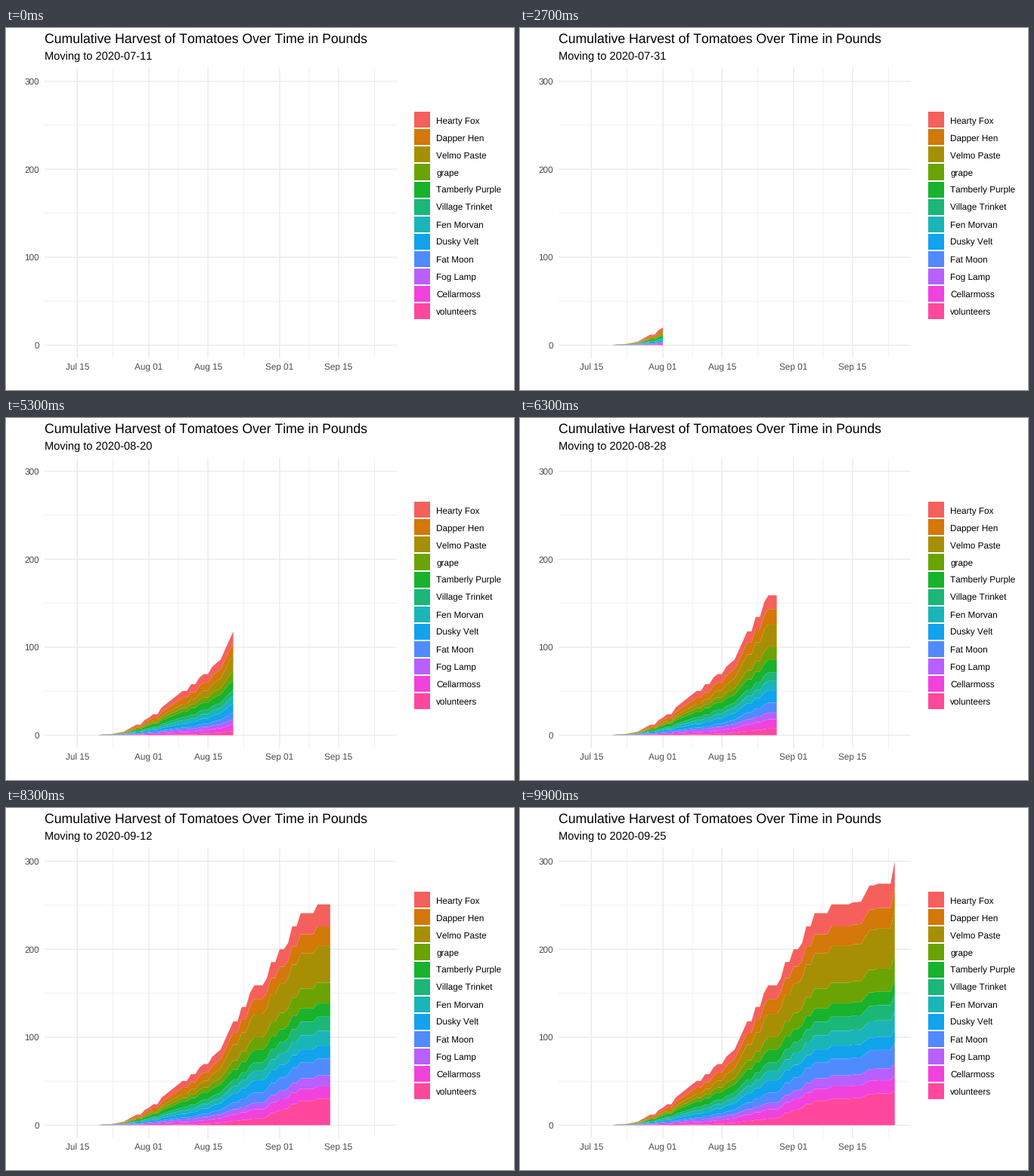
These frames come from a looping animation (672 px wide and 480 px high, 10000 ms). A matplotlib script:

```python
import numpy as np
import matplotlib.pyplot as plt
from matplotlib.animation import FuncAnimation
from matplotlib.patches import Polygon, Rectangle

plt.rcParams["font.family"] = "Liberation Sans"
plt.rcParams["text.hinting"] = "none"
plt.rcParams["text.kerning_factor"] = 6      # no pair kerning

W, H, DPI = 672, 480, 96
FRAMES, INTERVAL = 100, 100
LAST_DAY = 76          # days after July 11
FIRST_PICK = 9
LEFT, RIGHT, TOP, BOTTOM = 50.8, 517, 52.5, 438
GREY = "#4D4D4D"

# Name, colour, pounds picked once the whole harvest reaches each milestone.
MILESTONES = (58, 159, 274.5)
VARIETIES = [
    ("Hearty Fox", "#F5605C", (9, 15.5, 27.5)),
    ("Dapper Hen", "#D37809", (8, 17, 23.5)),
    ("Velmo Paste", "#A78F05", (5.5, 26.5, 45.5)),
    ("grape", "#6BA304", (4.5, 14.5, 26)),
    ("Tamberly Purple", "#18B22C", (7.5, 14, 15.5)),
    ("Village Trinket", "#1AB778", (4, 10, 17.5)),
    ("Fen Morvan", "#1AB5B8", (4.5, 10.5, 18.5)),
    ("Dusky Velt", "#12A3ED", (5, 14, 15)),
    ("Fat Moon", "#508AFF", (2.5, 11.5, 21)),
    ("Fog Lamp", "#B85FFF", (3.5, 7.5, 13.5)),
    ("Cellarmoss", "#F142DD", (3, 10.5, 15)),
    ("volunteers", "#FF479D", (1, 7.5, 36)),
]

# Harvest trend as (day, pounds); on rest days the total stands still.
TREND = [(9, 0), (10, 1), (12, 1.2), (15, 4), (21, 20), (31, 58), (34, 69.5),
         (38, 86), (41, 118), (46, 159), (49, 167.5), (50, 185.5), (52, 200),
         (54, 207), (55, 226), (57, 241), (61, 251), (68, 254), (70, 272.5),
         (72, 274.5), (76, 300)]
REST = {19, 23, 30, 32, 35, 42, 44, 47, 48, 51, 53, 56, 71,
        *range(58, 61), *range(62, 66), *range(73, 76)}


def px(day):
    return 72 + 5.576 * np.asarray(day, float)


def py(pounds):
    return 420.6 - 1.1665 * np.asarray(pounds, float)


def band_edges(totals):
    """Stacked edges, top to bottom, with the zero line last."""
    parts = np.array([np.interp(totals, (0, *MILESTONES), (0, *picked))
                      for _, _, picked in VARIETIES])
    parts *= totals / np.maximum(parts.sum(axis=0), 1e-9)
    return np.vstack([parts[::-1].cumsum(axis=0)[::-1], np.zeros(len(totals))])


days = np.arange(FIRST_PICK, LAST_DAY + 1)
pick_days = [d for d in days if d not in REST]
trend = np.interp(pick_days, *zip(*TREND))
totals = trend[np.searchsorted(pick_days, days, side="right") - 1]
edges = band_edges(totals)

# Each day is reached on a whole frame; the front moves evenly in between.
all_days = np.arange(LAST_DAY + 1)
arrival = np.round((FRAMES - 1) * all_days / LAST_DAY)

fig = plt.figure(figsize=(W / DPI, H / DPI), dpi=DPI, facecolor="white")
ax = fig.add_axes([0, 0, 1, 1])
ax.set_xlim(0, W)
ax.set_ylim(H, 0)
ax.axis("off")


def rule(xs, ys, px_width):
    ax.plot(xs, ys, color="#EBEBEB", lw=px_width * 72 / DPI, snap=False,
            solid_capstyle="butt", zorder=1)


def label(x, y, text, size, color="black", ha="left"):
    return ax.text(x, y, text, size=size, color=color, ha=ha, va="baseline")


ticks = {4: "Jul 15", 21: "Aug 01", 35: "Aug 15", 52: "Sep 01", 66: "Sep 15"}
for day in (12.5, 28, 43.5, 59, 74.5):
    rule([px(day)] * 2, [TOP, BOTTOM], 0.71)
for pounds in (50, 150, 250):
    rule([LEFT, RIGHT], [py(pounds)] * 2, 0.71)
for day, name in ticks.items():
    rule([px(day)] * 2, [TOP, BOTTOM], 1.42)
    label(px(day), 453, name, 8.8, GREY, "center")
for pounds in (0, 100, 200, 300):
    rule([LEFT, RIGHT], [py(pounds)] * 2, 1.42)
    label(44, py(pounds) + 4.2, str(pounds), 8.8, GREY, "right")

label(50.8, 20, "Cumulative Harvest of Tomatoes Over Time in Pounds", 13.2)
subtitle = label(50.8, 42, "", 11)

bands = []
for i, (name, color, _) in enumerate(VARIETIES):
    y = 111.36 + 23.04 * i
    ax.add_patch(Rectangle((540, y), 21.3, 21.04, fc=color, lw=0))
    label(569.4, y + 15.1, name, 8.8)
    band = Polygon(np.zeros((3, 2)), fc=color, lw=0, zorder=2, visible=False)
    bands.append(ax.add_patch(band))


def date_text(day):
    month, dom = 7, 11 + day
    while dom > 31:        # July and August both have 31 days
        month, dom = month + 1, dom - 31
    return f"2020-{month:02d}-{dom:02d}"


def draw(frame):
    subtitle.set_text("Moving to " + date_text(frame * LAST_DAY // (FRAMES - 1)))
    front = np.interp(frame, arrival, all_days)
    shown = bool(front > FIRST_PICK)
    ds = np.append(days[days < front], front)
    xs = px(np.append(ds, ds[::-1]))
    ys = [py(np.interp(ds, days, edge)) for edge in edges]
    for band, upper, lower in zip(bands, ys, ys[1:]):
        band.set_visible(shown)
        band.set_xy(np.column_stack([xs, np.append(upper, lower[::-1])]))
    return [subtitle, *bands]


anim = FuncAnimation(fig, draw, frames=FRAMES, interval=INTERVAL,
                     repeat=True, repeat_delay=0, blit=False)
plt.show()
```
